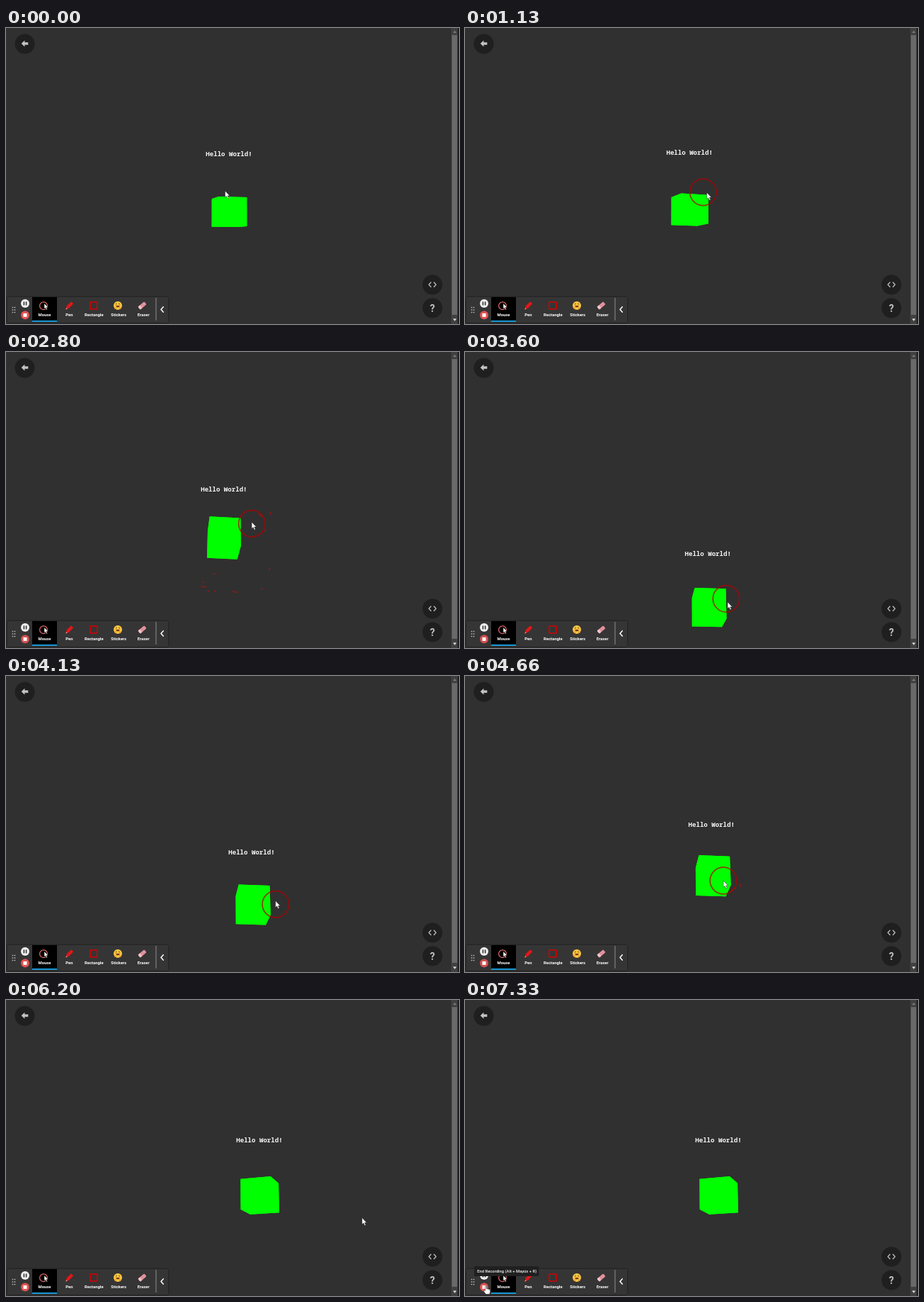
Recreate the animation shown at these times as an HTML page. Size 640x418 px, loop 7400 ms.

```html
<!DOCTYPE html>
<html lang="en">
<head>
<meta charset="utf-8">
<title>Hello World cube</title>
<style>
  html, body { margin: 0; width: 100%; height: 100%; overflow: hidden; background: #303030; }
  svg { display: block; width: 100vw; height: 100vh; }
  .hello { font: 700 9.08px "Noto Sans Mono", "DejaVu Sans Mono", monospace; fill: #f4f4f4; text-anchor: middle; }
  .labels text { font: 700 5.9px Roboto, Arial, sans-serif; fill: #fff; text-anchor: middle; }
  .tip text { font: 500 5.85px Roboto, Arial, sans-serif; fill: #f2f2f2; }
  .line { fill: none; stroke-linecap: round; stroke-linejoin: round; }
</style>
</head>
<body>
<svg viewBox="0 0 640 418" preserveAspectRatio="none">
  <defs>
    <path id="arrow" d="M0 0V9.3L2.1 7.4L3.7 11L5.3 10.3L3.7 6.9H6.6Z"/>
    <filter id="shade" x="-10%" y="-30%" width="120%" height="160%">
      <feDropShadow dx="0" dy="0" stdDeviation="1.6" flood-color="#000" flood-opacity=".6"/>
    </filter>
  </defs>
  <rect width="640" height="418" fill="#303030"/>

  <!-- scrollbar -->
  <rect x="629" width="9" height="418" fill="#404040"/>
  <rect x="638" width="2" height="418" fill="#1e1e1e"/>
  <rect x="630" y="10" width="7.5" height="395" fill="#696969"/>
  <path d="M631.5 7L634 3.5L636.5 7Z" fill="#777"/>
  <path d="M631.5 410.5L634 414L636.5 410.5Z" fill="#ddd"/>

  <!-- round buttons -->
  <g fill="#1f1f1f">
    <circle cx="26.5" cy="22.5" r="14"/>
    <circle cx="602.5" cy="362.5" r="14"/>
    <circle cx="602.5" cy="395.5" r="14"/>
  </g>
  <path d="M21.7 22L26.4 17.6V20.3H31.3V23.7H26.4V26.4Z" fill="#c4c4c4"/>
  <path class="line" d="M600.3 359.3L597.4 362.4L600.3 365.5M604.7 359.3L607.6 362.4L604.7 365.5" stroke="#c4c4c4" stroke-width="1.3"/>
  <text x="602.5" y="400.5" font-family="Roboto, Arial, sans-serif" font-weight="700" font-size="14" fill="#c4c4c4" text-anchor="middle">?</text>

  <!-- scene -->
  <path id="marks" class="line" stroke="#8e1a1a" stroke-width="1.4"/>
  <g id="cube" fill="#00ff00"></g>
  <text id="hello" class="hello">Hello World!</text>

  <!-- toolbar -->
  <rect x="2" y="380" width="227" height="36" rx="1.5" fill="#343434" filter="url(#shade)"/>
  <g id="grip" fill="#c8c8c8"></g>
  <rect x="37" y="380" width="35" height="35" fill="#000"/>
  <rect x="37" y="413" width="35" height="2" fill="#1697d4"/>
  <circle cx="27" cy="389" r="6" fill="#efefef"/>
  <path d="M25.4 386.5V391.5M28.6 386.5V391.5" stroke="#333" stroke-width="1.6"/>
  <circle id="record" cx="27" cy="405.5" r="6" fill="#e25454"/>
  <rect x="24.5" y="403" width="5" height="5" rx=".6" fill="#fff"/>
  <circle cx="53" cy="392.3" r="5.4" fill="none" stroke="#e06a6a" stroke-width="1.2"/>
  <use href="#arrow" transform="translate(54 388.8) scale(.84)" fill="#fff" stroke="#000" stroke-width=".6"/>
  <path d="M84.4 397.6L86 392.2L92 386.4L95.2 389.3L89.4 395.5Z" fill="#e01818"/>
  <path d="M84.4 397.6L85.1 395.2L86.8 396.7Z" fill="#ff9c9c"/>
  <rect x="119" y="387" width="10" height="10" rx=".8" fill="none" stroke="#d80000" stroke-width="1.6"/>
  <circle cx="158" cy="392" r="6" fill="#fbc740"/>
  <path class="line" d="M155.2 390L156.4 389.6M159.6 389.6L160.8 390" stroke="#5b3a14" stroke-width="1"/>
  <path d="M155.2 391.9H160.8Q160.2 394.4 158 394.4T155.2 391.9Z" fill="#7a3b16"/>
  <circle cx="155" cy="395.6" r="1.5" fill="#f0a030"/>
  <circle cx="161" cy="395.6" r="1.5" fill="#f0a030"/>
  <g transform="rotate(-40 192.5 392)">
    <rect x="186.7" y="389.4" width="11.6" height="5.2" rx="1.2" fill="#e0909c"/>
    <rect x="186.7" y="389.4" width="3.6" height="5.2" rx="1.2" fill="#f2c4ca"/>
  </g>
  <g class="labels" id="labels"></g>
  <path d="M212 381V413" stroke="#909090" stroke-width="1"/>
  <path class="line" d="M222.3 393.8L219 397.5L222.3 401.2" stroke="#fff" stroke-width="1.5"/>

  <g id="tip" class="tip">
    <rect x="13" y="376" width="91.5" height="14" rx="1.5" fill="#202020"/>
    <text x="17.2" y="385.1">End Recording (Alt + Mayús + R)</text>
  </g>

  <circle id="ring" r="18.8" fill="none" stroke="#b00000" stroke-width="1.7"/>
  <use id="pointer" href="#arrow" fill="#fff" stroke="#222" stroke-width=".5"/>
  <path id="hand" d="M-1 1Q0-.6 1 1V5Q2.2 4 3 5.3Q4.2 4.7 4.8 5.9Q6 5.6 6.1 7V9.4L5 12.6H0L-3.2 8.2Q-3 6.4-1 7.4Z" fill="#fff" stroke="#222" stroke-width=".6"/>
</svg>
<script>
const LOOP = 7400, STEP = 1000 / 15;
const RING = 18.8, RING_LAG = 65;
const DEPTH = 700, VANISH_X = 315, LABEL_HEIGHT = 82.6;
const $ = id => document.getElementById(id);
const clamp = v => Math.max(0, Math.min(1, v));
const ease = v => clamp(v) ** 2 * (3 - 2 * clamp(v));

// cube: time, centre x, centre y, yaw, pitch
const poses = [
  [600, 315, 260.3, 0.27, 0.055],
  [1860, 320.7, 252.5, 0.525, 0.28],
  [2800, 307.5, 263, 0.1, 0.48],
  [3600, 344.2, 361.3, 0.08, 0.305],
  [4660, 349.8, 282.8, 0.09, 0.405],
  [5530, 279, 276, 0.505, 0.18],
  [6200, 359, 276.8, -0.35, 0.205]
];

// pointer tip: time, x, y
const route = [
  [600, 309.5, 230], [1460, 357, 236], [1860, 293, 303], [1960, 279, 309],
  [2260, 304, 322], [2550, 357, 316], [2760, 347, 239.5], [3660, 372.5, 354.5],
  [4100, 381, 320], [4590, 365, 289], [4680, 365, 289], [4900, 348, 272],
  [5410, 503, 307.5], [6400, 503, 307.5], [7060, 29.5, 403]
];

// monotone cubic through one column of keys
function track(keys, col, t) {
  const last = keys.length - 1;
  if (t <= keys[0][0]) return keys[0][col];
  if (t >= keys[last][0]) return keys[last][col];
  let i = 0;
  while (t >= keys[i + 1][0]) i++;
  const slope = k => (keys[k + 1][col] - keys[k][col]) / (keys[k + 1][0] - keys[k][0]);
  const tangent = k => {
    if (k === 0 || k === last) return 0;
    const a = slope(k - 1), b = slope(k);
    return a * b <= 0 ? 0 : 2 * a * b / (a + b);
  };
  const span = keys[i + 1][0] - keys[i][0], u = (t - keys[i][0]) / span, v = 1 - u;
  return keys[i][col] * (1 + 2 * u) * v * v + keys[i + 1][col] * u * u * (3 - 2 * u)
    + span * (tangent(i) * u * v * v - tangent(i + 1) * u * u * v);
}

const pointerAt = t => [track(route, 1, t), track(route, 2, t)];
const cubeAt = t => [1, 2, 3, 4].map(col => track(poses, col, t));

// turns a point of the cube's own space into stage coordinates
function projector([cx, cy, yaw, pitch]) {
  const c = Math.cos(yaw), s = Math.sin(yaw), cp = Math.cos(pitch), sp = Math.sin(pitch);
  return ([x, y, z]) => {
    const k = DEPTH / (DEPTH + x * s * cp - y * sp + z * c * cp);
    return [
      VANISH_X + (cx - VANISH_X + x * c - z * s) * k,
      cy + (x * s * sp + y * cp + z * c * sp) * k
    ];
  };
}

function drawCube(t) {
  const project = projector(cubeAt(t));
  const half = (40.3 + 3 * ease((t - 1860) / 900)) / 2;
  [...$("cube").children].forEach((face, i) => {
    const axis = i % 3, side = i < 3 ? -half : half;
    const corners = [[-1, -1], [1, -1], [1, 1], [-1, 1]].map(([u, v]) => {
      const point = [];
      point[axis] = side;
      point[(axis + 1) % 3] = u * half;
      point[(axis + 2) % 3] = v * half;
      return project(point);
    });
    face.setAttribute("points", corners.join(" "));
  });
  const [x, y] = project([0, -LABEL_HEIGHT, 0]);
  $("hello").setAttribute("x", x);
  $("hello").setAttribute("y", y + 3);
}

// scraps of the ring's outer edge stay behind until the next wipe
function scraps(t, from, to, wipe) {
  let d = "";
  for (let born = from, k = 0; born < Math.min(t, to) && t < wipe; born += 115, k++) {
    const [x, y] = pointerAt(born), [cx, cy] = cubeAt(born);
    const angle = Math.atan2(y - cy, x - cx) + 0.5 * Math.sin(k * 7.3);
    const sweep = 0.1 + 0.08 * Math.sin(k * 4.1);
    const edge = a => `${x + RING * Math.cos(a)} ${y + RING * Math.sin(a)}`;
    d += `M${edge(angle - sweep)}L${edge(angle + sweep)}`;
  }
  return d;
}

function draw(t) {
  drawCube(t);
  $("marks").setAttribute("d", scraps(t, 1460, 2750, 3000) + scraps(t, 4400, 5400, 6200));

  const [x, y] = pointerAt(t), overBar = y > 400;
  for (const id of ["pointer", "hand"]) $(id).setAttribute("transform", `translate(${x} ${y})`);
  $("pointer").style.display = overBar ? "none" : "";
  $("hand").style.display = overBar ? "" : "none";

  const [rx, ry] = pointerAt(t - RING_LAG);
  $("ring").setAttribute("cx", rx);
  $("ring").setAttribute("cy", ry);
  $("ring").style.opacity = t < 660 ? 0 : 0.75 * clamp((5900 - t) / 300);

  $("record").style.opacity = 0.94 + 0.06 * Math.cos(t / LOOP * 14 * Math.PI);
  $("tip").style.opacity = clamp((t - 7090) / 150);
}

$("cube").innerHTML = "<polygon/>".repeat(6);
["Mouse", "Pen", "Rectangle", "Stickers", "Eraser"].forEach((name, i) => {
  $("labels").insertAdjacentHTML("beforeend", `<text x="${54.5 + i * 34.9}" y="406.8">${name}</text>`);
});
for (let i = 0; i < 6; i++) {
  $("grip").insertAdjacentHTML("beforeend",
    `<circle cx="${9.5 + i % 2 * 3}" cy="${394.5 + Math.floor(i / 2) * 3.5}" r=".85"/>`);
}

const start = performance.now();
function tick() {
  const t = (performance.now() - start) % LOOP;
  draw(Math.floor((t + 7) / STEP) * STEP % LOOP);
  requestAnimationFrame(tick);
}
tick();
</script>
</body>
</html>
```
